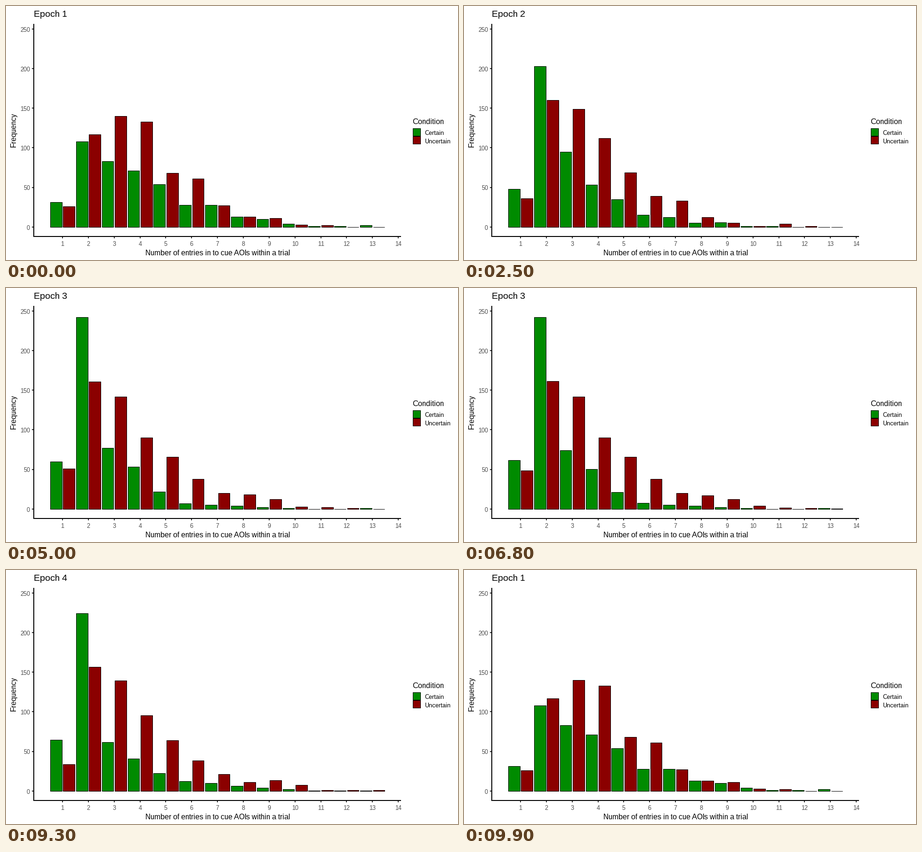
A matplotlib script that plays this animation: 960x540 px, repeating every 10 s.

```python
import matplotlib.pyplot as plt
import numpy as np
from matplotlib.animation import FuncAnimation
from matplotlib.patches import Rectangle

plt.rcParams["font.family"] = "Liberation Sans"
plt.rcParams["text.hinting"] = "native"
plt.rcParams["text.hinting_factor"] = 1

WIDTH, HEIGHT, DPI = 960, 540, 96
PT = 72 / DPI  # points per pixel
FRAMES, INTERVAL = 100, 100
STARTS, STEPS = (19, 44, 68, 93), 7

GREEN, RED = "#008B00", "#8B0000"
AXIS_TEXT, TICK = "#4D4D4D", "#333333"

# Bar heights by epoch, condition (certain, uncertain) and number of entries.
COUNTS = np.array([
    [[31, 108, 83, 71, 54, 28, 28, 13, 10, 4, 1, 1, 2],
     [26, 117, 140, 133, 68, 61, 27, 13, 11, 3, 2, 0, 0]],
    [[48, 203, 95, 53, 35, 15, 12, 5, 6, 1, 1, 0, 0],
     [36, 160, 149, 112, 69, 39, 33, 12, 5, 1, 4, 1, 0]],
    [[60, 242, 77, 53, 22, 7, 5, 4, 2, 1, 0, 0, 1],
     [51, 161, 142, 90, 66, 38, 20, 18, 12, 3, 2, 1, 0]],
    [[70, 244, 58, 36, 17, 10, 7, 5, 3, 2, 0, 0, 0],
     [35, 163, 139, 89, 63, 35, 20, 11, 14, 8, 1, 1, 1]],
], dtype=float)

GROUP = 54.85
BAR_WIDTH = 0.45 * GROUP
BASE = 470

fig = plt.figure(figsize=(WIDTH / DPI, HEIGHT / DPI), dpi=DPI, facecolor="white")
ax = fig.add_axes([0, 0, 1, 1])
ax.set_xlim(0, WIDTH)
ax.set_ylim(HEIGHT, 0)
ax.axis("off")


def x_pos(entries):
    return 120.55 + GROUP * (entries - 1)


def y_pos(count):
    return 470.2 - 1.684 * count


def fill(x, y, w, h, color):
    ax.add_patch(Rectangle((x, y), w, h, facecolor=color, linewidth=0, snap=False))


def outlined(left, top, right, bottom, color):
    """Box whose one-pixel outline runs through the given pixels."""
    return ax.add_patch(Rectangle(
        (left + 0.5, top + 0.5), right - left, bottom - top, facecolor=color,
        edgecolor="black", linewidth=PT, joinstyle="miter", snap=False))


def label(x, y, text, size, color="black", ha="left", rotation=0):
    return ax.text(x, y, text, fontsize=size * PT, color=color, ha=ha,
                   va="baseline", rotation=rotation, rotation_mode="anchor")


def draw_axes():
    for count in range(0, 251, 50):
        y = y_pos(count)
        fill(55, int(y) - 1, 3, 2, TICK)
        label(51, round(y + 5.4), str(count), 13, AXIS_TEXT, "right")
    for entries in range(1, 15):
        x = int(x_pos(entries))
        fill(x - 1, 491, 2, 3, TICK)
        label(x, 510, str(entries), 13, AXIS_TEXT, "center")
    fill(58, 38, 2, 453, "black")
    fill(58, 489, 781, 2, "black")
    label(449, 530, "Number of entries in to cue AOIs within a trial", 16, ha="center")
    label(21, 263, "Frequency", 16, ha="center", rotation=90)


def draw_legend():
    label(863, 251, "Condition", 16)
    outlined(864, 260, 880, 276, GREEN)
    outlined(864, 277, 880, 293, RED)
    label(889, 274, "Certain", 13)
    label(889, 292, "Uncertain", 13)


def make_bar(condition, index):
    left = x_pos(index + 1) - 0.475 * GROUP + condition * GROUP / 2
    return outlined(int(left), BASE, int(left + BAR_WIDTH), BASE, (GREEN, RED)[condition])


def state_at(frame):
    """Epoch index and progress towards the following epoch."""
    for epoch, start in enumerate(STARTS):
        if frame < start:
            return epoch, 0.0
        if frame < start + STEPS - 1:
            return epoch, (frame - start + 1) / STEPS
    return 0, 0.0


def update(frame):
    epoch, t = state_at(frame)
    following = (epoch + 1) % len(COUNTS)
    counts = (1 - t) * COUNTS[epoch] + t * COUNTS[following]
    for bar, count in zip(bars, counts.ravel()):
        top = int(y_pos(count) + 1e-6)
        bar.set_y(top + 0.5)
        bar.set_height(BASE - top)
    title.set_text(f"Epoch {(following if t > 0.5 else epoch) + 1}")
    return [*bars, title]


draw_axes()
draw_legend()
title = label(59, 23, "Epoch 1", 19)
bars = [make_bar(c, i) for c in range(2) for i in range(COUNTS.shape[2])]

animation = FuncAnimation(fig, update, frames=FRAMES, interval=INTERVAL,
                          repeat=True, repeat_delay=0)
plt.show()
```
